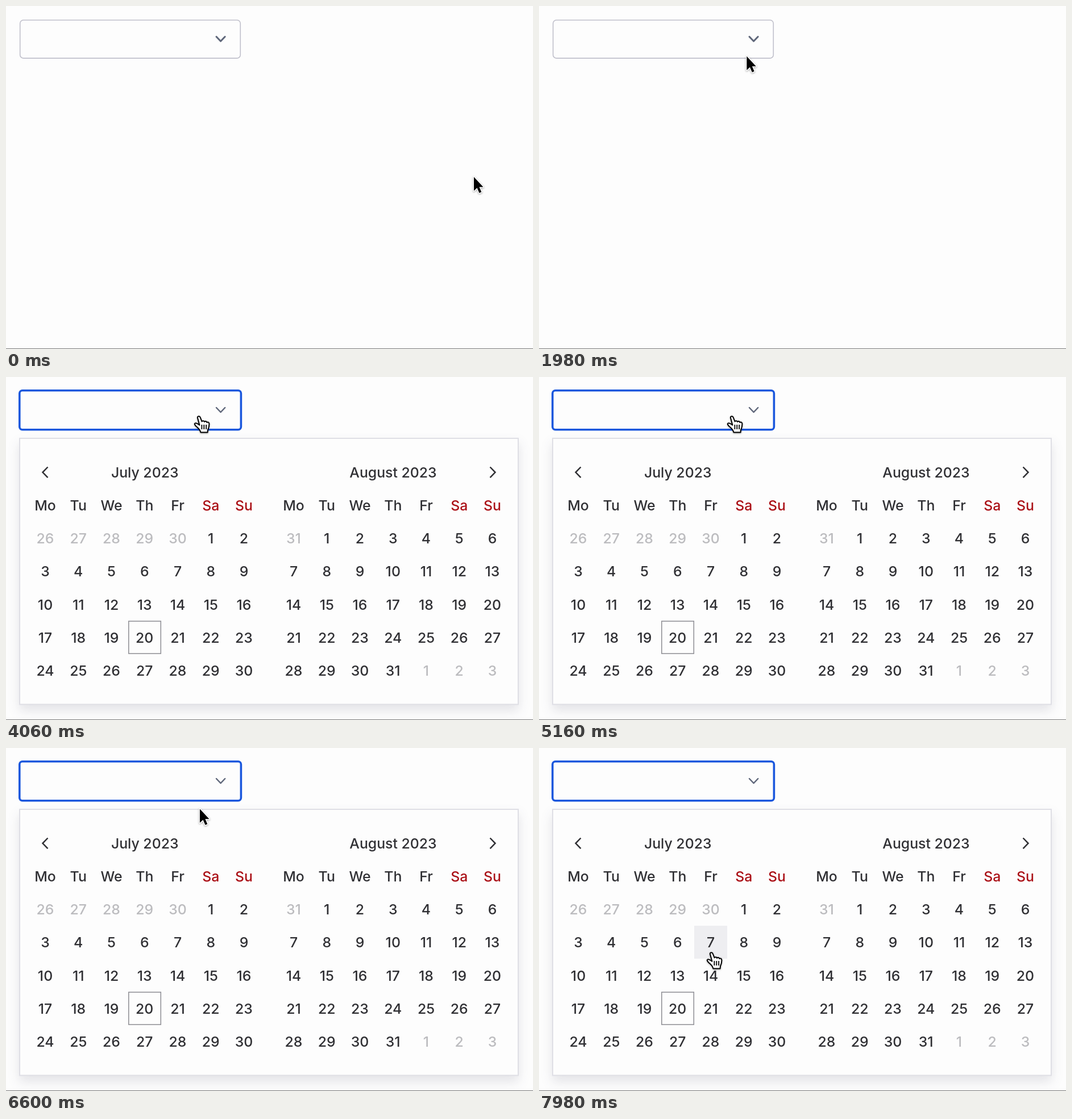
Animation, 927 px wide and 604 px high, one loop 8000 ms. Source, as an HTML page:

```html
<!DOCTYPE html>
<html lang="en">
<head>
<meta charset="utf-8">
<title>Date range picker</title>
<style>
  html, body { margin: 0; width: 100%; height: 100%; overflow: hidden; background: #fdfdfd; }
  svg { display: block; width: 927px; height: 604px; }
  text { font: 500 24.8px Inter, "Noto Sans", sans-serif; text-anchor: middle; fill: #303034; }
  .weekend { fill: #ab1218; }
  .outside { fill: #bcbcbf; }
  .line { fill: none; stroke: #303034; stroke-width: 2.5; }
  #chevron { stroke: #5f677a; stroke-linecap: round; stroke-linejoin: round; }
  #panel { fill: #fdfdfd; stroke: #dfdfe5; stroke-width: 2; filter: drop-shadow(0 10px 10px rgba(40, 40, 70, .12)); }
  #arrow, #hand { filter: drop-shadow(0 1.5px 1.5px rgba(0, 0, 0, .35)); }
</style>
</head>
<body>
<svg viewBox="0 0 927 604">
  <rect width="927" height="604" fill="#fdfdfd"/>
  <path d="M0 603.5H927" stroke="#777"/>
  <rect id="field" fill="none"/>
  <path id="chevron" class="line" d="M370 54l7.6 8 7.6-8"/>
  <g id="calendar">
    <rect id="panel" x="24" y="108" width="877" height="468.5"/>
    <rect id="hover" x="273" y="313" width="58" height="58" fill="#eeeef1"/>
    <rect x="215.8" y="430" width="56.5" height="57" fill="none" stroke="#8c8c92" stroke-width="1.5"/>
    <path class="line" d="M73.5 158.5l-9 9.3 9 9.3M851.5 158.5l9 9.3-9 9.3"/>
    <g id="labels"></g>
  </g>
  <g id="cursor">
    <path id="arrow" d="M0 0V24.5L5.6 19.2 9.5 28.2 13.3 26.6 9.5 17.7H16.5Z"
      fill="#000" stroke="#fff" stroke-width="3" paint-order="stroke" stroke-linejoin="round"/>
    <g id="hand" transform="translate(-9 -3)">
      <path d="M6 4C5.3 1 9.4 0 10.6 3L13.6 10.4C14.5 8.6 17.6 8.8 18 11C19.2 9.3 22 9.8 22.4 12C23.8 10.8 26.3 11.4 26.4 14.5C26.6 20 25.5 22 24 25L23.6 29.5H11.5C10.6 25.6 6.2 21 3.6 19C1.5 17 0 15.5 1 14C2.2 12.5 5 13.3 9.4 16.6Z"
        fill="#fff" stroke="#000" stroke-width="2" stroke-linejoin="round"/>
      <path d="M13.4 16v8M17.3 16v8M21.2 16v8" stroke="#000" stroke-width="1.8"/>
    </g>
  </g>
</svg>
<script>
const LOOP = 8000, OPEN = 4060, PITCH = 58.25;
const $ = id => document.getElementById(id);

function setAttrs(node, attrs) {
  for (const key in attrs) node.setAttribute(key, attrs[key]);
}

function label(text, x, y, kind = "") {
  const node = document.createElementNS("http://www.w3.org/2000/svg", "text");
  setAttrs(node, { x, y: y + 9.1, class: kind });
  node.textContent = text;
  $("labels").append(node);
}

function month(title, titleX, left, lead, previousDays, days) {
  label(title, titleX, 167.5);
  ["Mo", "Tu", "We", "Th", "Fr", "Sa", "Su"].forEach((name, i) =>
    label(name, left + i * PITCH, 226, i > 4 ? "weekend" : ""));
  for (let i = 0; i < 35; i++) {
    const day = i - lead + 1;
    const text = day < 1 ? previousDays + day : day > days ? day - days : day;
    label(text, left + i % 7 * PITCH, 284 + Math.floor(i / 7) * PITCH,
      day < 1 || day > days ? "outside" : "");
  }
}

month("July 2023", 244.2, 69, 5, 30, 31);
month("August 2023", 681, 506, 1, 31, 31);

const ease = {
  hold: () => 0,
  in: u => u * u,
  out: u => Math.sin(u * Math.PI / 2),
  inOut: u => (1 - Math.cos(u * Math.PI)) / 2
};

// time, x, y, easing towards the next step
const path = [
  [0, 823, 301, "hold"],
  [20, 822, 300.5, "inOut"],
  [680, 610, 198, "hold"],
  [1400, 604, 196, "inOut"],
  [2120, 342, 78, "hold"],
  [2220, 341, 77, "inOut"],
  [2400, 338, 71, "inOut"],
  [2500, 340, 71, "hold"],
  [6300, 340, 71, "in"],
  [6600, 341, 107, "out"],
  [7750, 304, 362, "hold"],
  [LOOP, 304, 362, "hold"]
];

function pointerAt(time) {
  const i = path.findIndex(step => step[0] > time) - 1;
  const [t0, x0, y0, kind] = path[i];
  const [t1, x1, y1] = path[i + 1];
  const u = ease[kind]((time - t0) / (t1 - t0));
  return [x0 + (x1 - x0) * u, y0 + (y1 - y0) * u];
}

const show = (id, on) => { $(id).style.display = on ? "" : "none"; };

function draw(now) {
  const time = now % LOOP;
  const open = time >= OPEN;
  const [x, y] = pointerAt(time);
  const overDay = open && y > 313;
  const pointing = time >= 2220 && (y < 94 || overDay);

  setAttrs($("field"), open
    ? { x: 23.8, y: 23.8, width: 389.6, height: 69, rx: 5, stroke: "#1a57dd", "stroke-width": 3.6 }
    : { x: 24.7, y: 24.7, width: 387.6, height: 67.2, rx: 6, stroke: "#c0c0cb", "stroke-width": 1.6 });
  $("chevron").style.strokeWidth = open ? 2.5 : 3;
  show("calendar", open);
  show("hover", overDay);
  show("arrow", !pointing);
  show("hand", pointing);
  $("cursor").setAttribute("transform", `translate(${x} ${y})`);
  requestAnimationFrame(() => draw(performance.now()));
}
draw(0);
</script>
</body>
</html>
```
